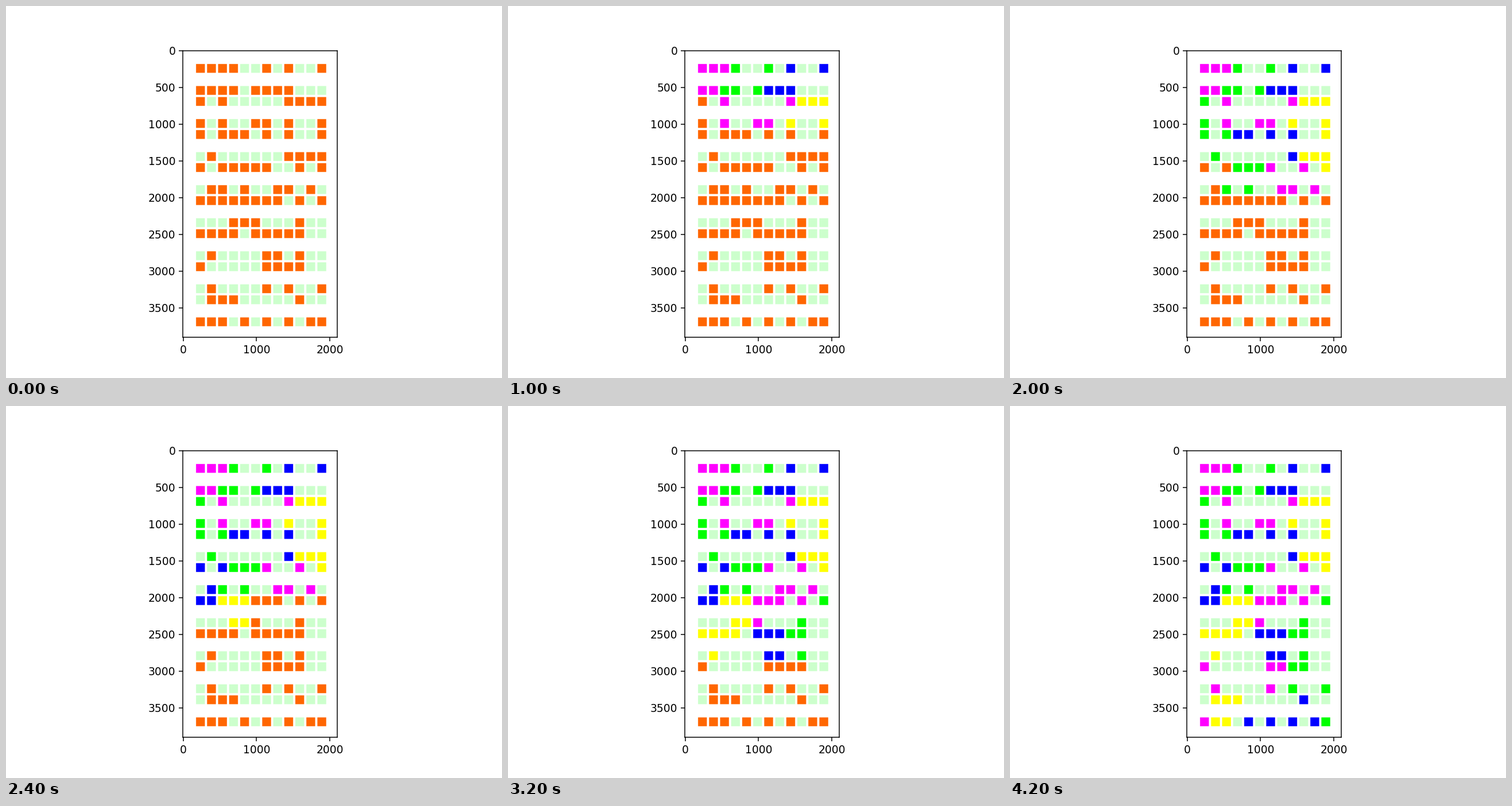
These frames come from a looping animation (864 px wide and 648 px high, 4400 ms). A matplotlib script:

```python
import numpy as np
import matplotlib.pyplot as plt
from matplotlib.animation import FuncAnimation

# Shelf map: '#' is a slot to visit; rows 0-1, 2-3, ... face the same aisle.
SHELVES = """
####..#.#..#
####.####...
#.#.....####
#.#..##.#..#
#.###.#.#..#
.#......####
#.#####..#.#
.##.#..##.#.
########.#.#
...###...#..
####.#####..
.#....##.#..
#.....####..
.#....#.#..#
.###.....#..
###.#.#.#.##
""".split()

WIDTH, HEIGHT = 2100, 3900
UNIT = 3                      # map units per array cell
PITCH, SLOT, MARGIN = 150, 120, 180
BATCH = 5
EMPTY, WAITING = (204, 255, 204), (255, 102, 0)
BATCH_COLORS = [(255, 0, 255), (0, 255, 0), (0, 0, 255), (255, 255, 0)]


def paint(img, row, col, color):
    x = (MARGIN + PITCH * col) // UNIT
    y = (MARGIN + PITCH * (row + (row + 1) // 2)) // UNIT
    size = SLOT // UNIT
    img[y:y + size, x:x + size] = color


def picking_route():
    """Serpentine walk through the aisles, both sides at once."""
    cells = []
    for aisle in range(len(SHELVES) // 2):
        walk = [(row, col) for col in range(len(SHELVES[0]))
                for row in (2 * aisle, 2 * aisle + 1)]
        cells += walk[::-1] if aisle % 2 else walk
    return [(r, c) for r, c in cells if SHELVES[r][c] == "#"]


route = picking_route()
batches = [route[i:i + BATCH] for i in range(0, len(route), BATCH)]

base = np.full((HEIGHT // UNIT, WIDTH // UNIT, 3), 255, dtype=np.uint8)
for r, line in enumerate(SHELVES):
    for c, mark in enumerate(line):
        paint(base, r, c, WAITING if mark == "#" else EMPTY)

fig, ax = plt.subplots(figsize=(6.4, 4.8), dpi=135)
picture = ax.imshow(base, extent=(-0.5, WIDTH - 0.5, HEIGHT - 0.5, -0.5))
ax.set_xticks(range(0, WIDTH, 1000))
ax.set_yticks(range(0, HEIGHT, 500))


def draw(step):
    img = base.copy()
    for i, batch in enumerate(batches[:step]):
        for r, c in batch:
            paint(img, r, c, BATCH_COLORS[i % len(BATCH_COLORS)])
    picture.set_data(img)
    return [picture]


anim = FuncAnimation(fig, draw, frames=len(batches) + 1, interval=200,
                     repeat=True, repeat_delay=0, blit=False)
plt.show()
```
